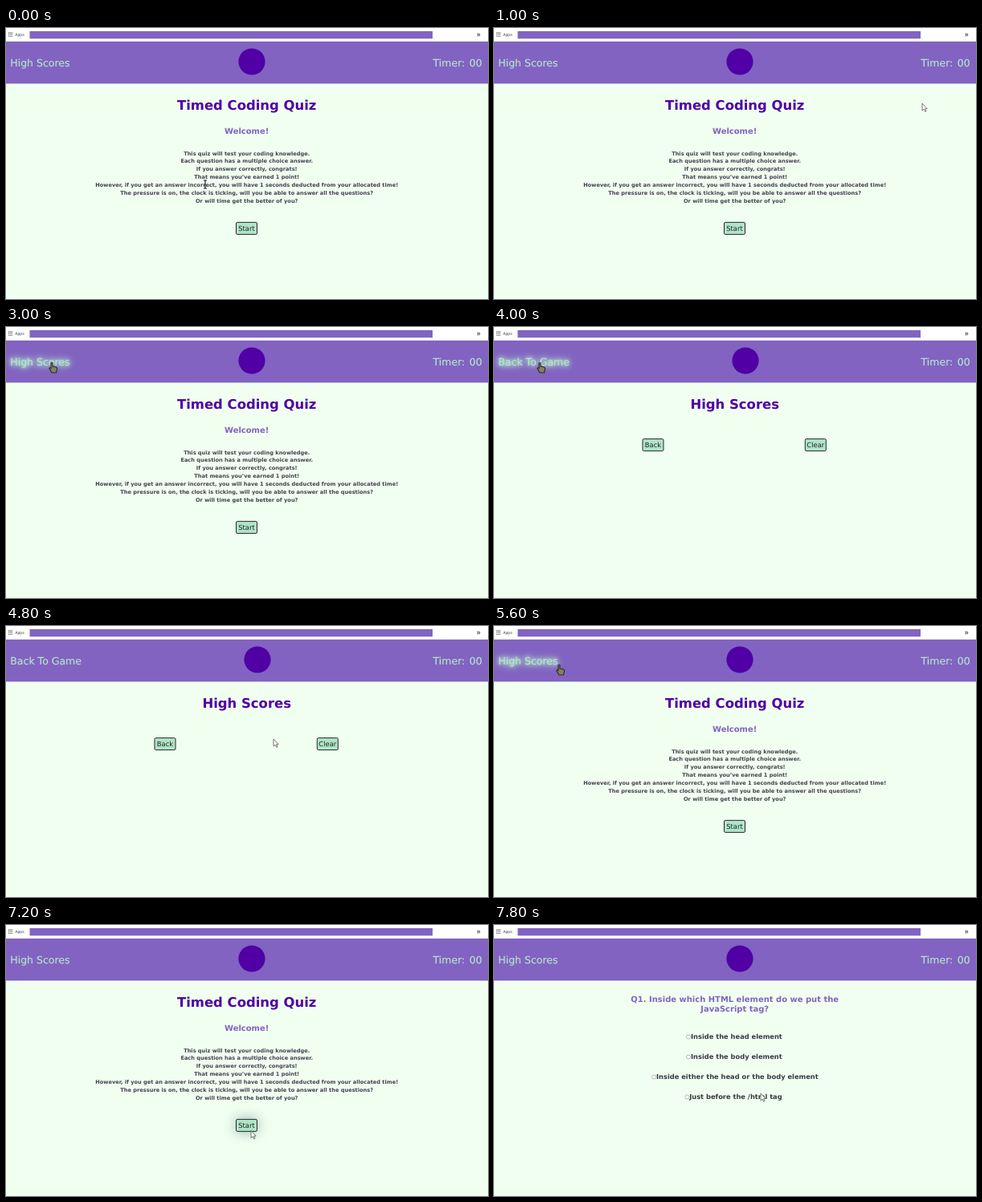
Animation of 600 by 338 pixels, one loop 8 s. Source, as an HTML page:

```html
<!DOCTYPE html>
<html lang="en">
<head>
<meta charset="utf-8">
<title>Timed Coding Quiz</title>
<style>
  html, body { margin: 0; height: 100%; overflow: hidden; background: #f0fff0; }
  svg { display: block; width: 100%; height: 100%; }
  text { font-family: "DejaVu Sans", Verdana, sans-serif; font-size: 8.4px; text-rendering: geometricPrecision; }
  .mid { text-anchor: middle; }
  .bold { font-weight: bold; }
  .nav { font-size: 12.5px; fill: #b4e6ca; stroke: #b4e6ca; stroke-width: .15; }
  .title { font-size: 16.45px; fill: #5000a5; }
  .sub { font-size: 9.97px; fill: #8263c1; }
  .body { font-size: 6.62px; fill: #45404f; }
  .option { font-size: 8.31px; fill: #3c3846; }
  .chrome { font: 5px Roboto, sans-serif; fill: #444; }
  .chevron { font-size: 10px; font-weight: bold; }
  .button rect { fill: #b0e4c6; stroke: #252a2a; stroke-width: 1; }
  .button text { fill: #1c2522; }
  .logo { fill: #5000a5; }
  .logo.glow { filter: drop-shadow(0 0 3px #b4e6ca) drop-shadow(0 0 5px #b4e6ca); }
  .nav.glow { filter: drop-shadow(0 0 2px #b4f0ca) drop-shadow(0 0 4px #b4f0ca); }
  .button.glow rect { filter: drop-shadow(0 0 8px #6b8a95b0); }
</style>
</head>
<body>
<svg viewBox="0 0 600 338" preserveAspectRatio="none">
  <rect width="600" height="338" fill="#f0fff0"/>
  <rect width="600" height="17" fill="#fff"/>
  <path d="M3 6h5M3 8.2h5M3 10.4h5" stroke="#777" stroke-width="1.3" stroke-dasharray="1.3 .6"/>
  <text class="chrome" x="11.3" y="10">Apps</text>
  <rect x="29.5" y="4" width="501.5" height="9.3" fill="#8263c1"/>
  <text class="chrome chevron" x="585.8" y="11">»</text>
  <rect y="16.3" width="600" height=".7" fill="#dadce0"/>
  <rect y="17" width="600" height="52.4" fill="#8263c1"/>
  <text id="link" class="nav" x="5.3" y="48"></text>
  <circle id="logo" class="logo" cy="42" r="16.6"/>
  <text class="nav" x="531.6" y="48" style="word-spacing:1.4px">Timer: 00</text>
  <g id="home"></g>
  <g id="scores"></g>
  <g id="question"></g>
  <g id="cursor">
    <path id="arrow" d="M0 0V9L2.1 7.2L3.6 10.2L5 9.6L3.6 6.7H6.2Z" fill="#fff" stroke="#555" stroke-width=".8"/>
    <path id="beam" d="M-2-5H2M0-5V5M-2 5H2" fill="none" stroke="#222" stroke-width="1.2"/>
    <path id="hand" d="M-1 0Q0-1 1 0V4L5 5Q7 5.5 6.5 8L5.5 12H0L-3 7Q-3 5-1 6.5Z" fill="#858062" stroke="#2d2c22" stroke-width="1.1"/>
  </g>
</svg>
<script>
const $ = id => document.getElementById(id);
const LOOP = 8000, STEP = 200;

const text = (style, x, y, words) => `<text class="${style}" x="${x}" y="${y}">${words}</text>`;
const button = (x, y, label, id = "") =>
  `<g class="button" id="${id}"><rect x="${x}" y="${y}" width="26" height="15" rx="1.6"/>` +
  text("mid", x + 13, y + 10.6, label) + "</g>";

const intro = [
  "This quiz will test your coding knowledge.",
  "Each question has a multiple choice answer.",
  "If you answer correctly, congrats!",
  "That means you’ve earned 1 point!",
  "However, if you get an answer incorrect, you will have 1 seconds deducted from your allocated time!",
  "The pressure is on, the clock is ticking, will you be able to answer all the questions?",
  "Or will time get the better of you?"
];
const options = [
  [245, "Inside the head element"],
  [245, "Inside the body element"],
  [202, "Inside either the head or the body element"],
  [243.2, "Just before the /html tag"]
];

$("home").innerHTML =
  text("title bold mid", 299.7, 102.2, "Timed Coding Quiz") +
  text("sub bold mid", 299.7, 132.3, "Welcome!") +
  intro.map((line, i) => text("body bold mid", 299.7, 158.5 + i * 9.98, line)).join("") +
  button(286.5, 242.4, "Start", "start");
$("scores").innerHTML =
  text("title bold mid", 299.7, 102.2, "High Scores") +
  button(185, 139.6, "Back") + button(387.3, 139.6, "Clear");
$("question").innerHTML =
  text("sub bold mid", 299.7, 95.8, "Q1. Inside which HTML element do we put the") +
  text("sub bold mid", 299.7, 108, "JavaScript tag?") +
  options.map(([x, label], i) => {
    const y = 142.4 + i * 24.95;
    return `<circle cx="${x - 2.9}" cy="${y - 2.8}" r="2.5" fill="#fff" stroke="#999" stroke-width=".7"/>` +
      text("option bold", x, y, label);
  }).join("");

// Pointer path: [ms, x, y]
const path = [
  [0, 248, 195], [400, 320, 225], [800, 480, 140], [1200, 586, 48],
  [1600, 315, 44], [1800, 306, 40], [2000, 302, 44], [2200, 235, 88], [2400, 165, 82],
  [2800, 70, 47], [3000, 57, 45], [4000, 57, 45], [4400, 190, 105],
  [4800, 333, 141], [5000, 250, 112], [5400, 83, 49], [5600, 81, 49],
  [6000, 150, 115], [6600, 285, 235], [6800, 300, 250], [7200, 305, 256.5],
  [7400, 306, 253], [7800, 332, 210], [LOOP, 332, 210]
];

function pointerAt(t) {
  const i = path.findIndex(([time]) => time > t);
  const [t0, x0, y0] = path[i - 1], [t1, x1, y1] = path[i];
  const k = (t - t0) / (t1 - t0);
  return [x0 + (x1 - x0) * k, y0 + (y1 - y0) * k];
}

function pageAt(t) {
  if (t >= 7400) return "question";
  return t >= 3800 && t < 5400 ? "scores" : "home";
}

const show = (id, visible) => $(id).setAttribute("display", visible ? "inline" : "none");
const glow = (id, on) => $(id).classList.toggle("glow", on);

function render(t) {
  const page = pageAt(t), [x, y] = pointerAt(t);
  const within = (left, top, right, bottom) => x >= left && x <= right && y >= top && y <= bottom;
  const onScores = page === "scores", logoX = onScores ? 313 : 306;
  const overLink = within(5, 35, onScores ? 95 : 82, 53);
  const overLogo = Math.hypot(x - logoX, y - 42) < 17;
  const overText = within(530, 36, 594, 52) ||
    page === "home" && (within(111, 151, 488, 220) || within(213, 88, 387, 105));
  const shape = overLink || overLogo ? "hand" : overText ? "beam" : "arrow";

  for (const id of ["home", "scores", "question"]) show(id, id === page);
  for (const id of ["arrow", "beam", "hand"]) show(id, id === shape);
  $("link").textContent = onScores ? "Back To Game" : "High Scores";
  $("logo").setAttribute("cx", logoX);
  glow("link", overLink);
  glow("logo", overLogo);
  glow("start", within(286, 242, 313, 258));
  $("cursor").setAttribute("transform", `translate(${x} ${y})`);
}

function frame() {
  render(Math.floor(performance.now() % LOOP / STEP) * STEP);
  requestAnimationFrame(frame);
}
frame();
</script>
</body>
</html>
```
